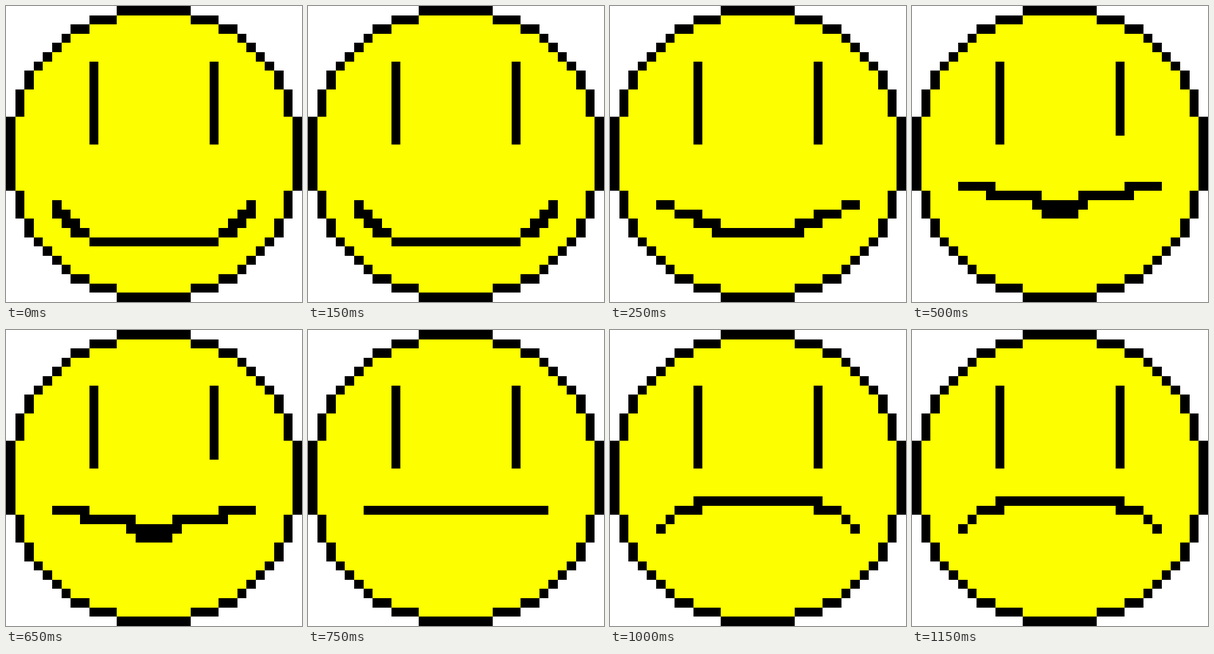
An HTML page that plays this animation: 500x500 px, repeating every 1.25 s.

```html
<!DOCTYPE html>
<html lang="en">
<head>
<meta charset="utf-8">
<title>Smile to frown</title>
<style>
  html, body { margin: 0; width: 100%; height: 100%; overflow: hidden; background: #fff; }
  svg { display: block; width: 500px; height: 500px; }
</style>
</head>
<body>
<svg viewBox="0 0 500 500" shape-rendering="crispEdges">
  <path id="rim" fill="#000"/>
  <path id="skin" fill="#fdff00"/>
  <path id="features" fill="#000"/>
</svg>
<script>
const GRID = 32, RADIUS = GRID / 2, POSE_MS = 250;

// Left half of each mouth: a few points of a line, in cells, ending at the centre
const POSES = [
  { mouth: [[5, 21.4], [9, 25], [16, 25]] },
  { mouth: [[5, 21.1], [12, 24.25], [16, 24.25]] },
  { mouth: [[5, 19.3], [13, 20.9], [15, 22.2], [16, 21.5]], rightEyeEnd: 13 },
  { mouth: [[6, 19.5], [16, 19.5]] },
  { mouth: [[5, 22], [7, 20], [10, 18.6], [16, 18.6]] }
];

const edge = cell => Math.ceil(cell * 500 / GRID - 0.5);
const mirror = cell => GRID - 1 - cell;

// Path for a block of cells, both ends included
function block(col0, row0, col1, row1) {
  const left = edge(col0), top = edge(row0);
  return `M${left} ${top}H${edge(col1 + 1)}V${edge(row1 + 1)}H${left}Z`;
}

const span = (row, first) => block(first, row, mirror(first), row);
const setPath = (id, d) => document.getElementById(id).setAttribute("d", d);

// First cell of the disc at a vertical distance from its centre
const discStart = dy =>
  Math.round(RADIUS - Math.sqrt(Math.max(0, RADIUS ** 2 - dy ** 2)));

function drawFace() {
  let rim = "", skin = "";
  for (let row = 0; row < GRID; row++) {
    const dy = Math.abs(row + 0.5 - RADIUS), outer = discStart(dy);
    rim += span(row, outer);
    skin += span(row, Math.max(outer + 1, discStart(dy + 1)));
  }
  setPath("rim", rim);
  setPath("skin", skin);
}

// Height of a line through the points at x
function heightAt(points, x) {
  const i = points.findIndex(([px]) => px >= x);
  const [x0, y0] = points[i - 1], [x1, y1] = points[i];
  return y0 + (y1 - y0) * (x - x0) / (x1 - x0);
}

// Fill the cells the line passes through in each column, on both sides
function mouthPath(points) {
  let d = "";
  for (let col = points[0][0]; col < RADIUS; col++) {
    const rows = [0.05, 0.95].map(dx => Math.floor(heightAt(points, col + dx)));
    const top = Math.min(...rows), bottom = Math.max(...rows);
    d += block(col, top, col, bottom) + block(mirror(col), top, mirror(col), bottom);
  }
  return d;
}

function featurePath({ mouth, rightEyeEnd = 14 }) {
  const eyes = block(9, 6, 9, 14) + block(22, 6, 22, rightEyeEnd);
  return eyes + mouthPath(mouth);
}

let start = null, shown = -1;

function render(now) {
  start ??= now;
  const pose = Math.floor((now - start) / POSE_MS) % POSES.length;
  if (pose !== shown) {
    setPath("features", featurePath(POSES[pose]));
    shown = pose;
  }
  requestAnimationFrame(render);
}

drawFace();
setPath("features", featurePath(POSES[0]));
requestAnimationFrame(render);
</script>
</body>
</html>
```
